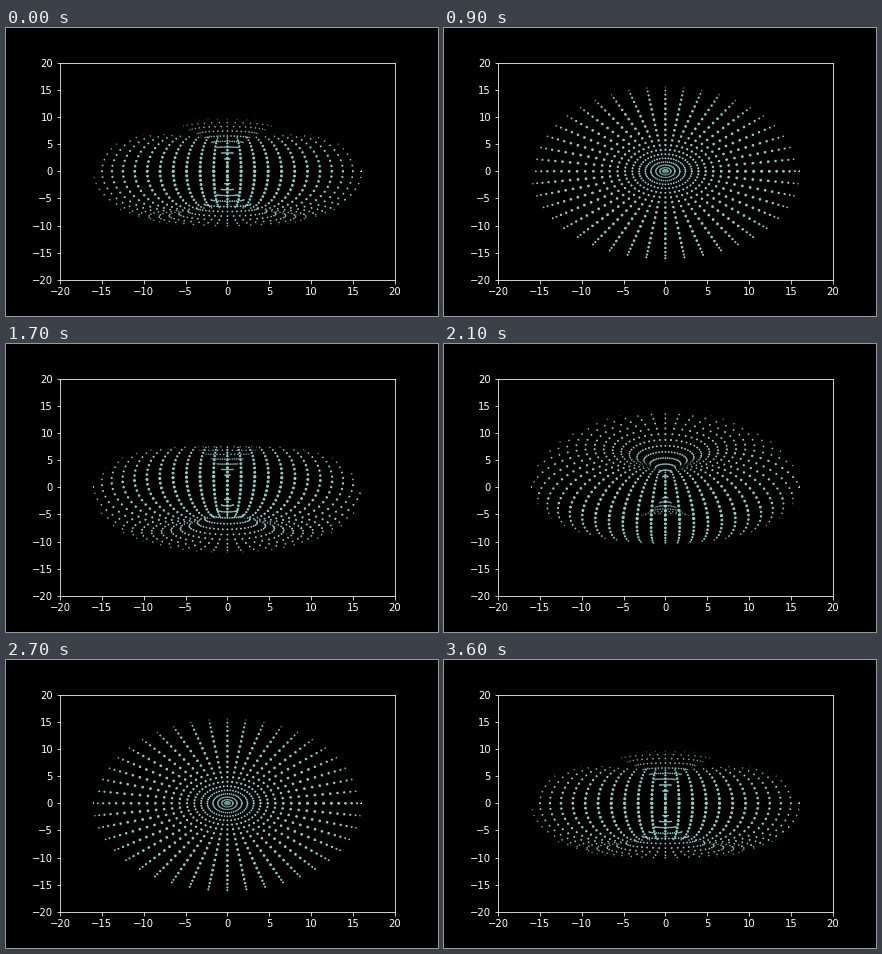
A matplotlib script that plays this animation: 432 px wide and 288 px high, repeating every 3700 ms.

```python
import numpy as np
import matplotlib.pyplot as plt
from matplotlib.animation import FuncAnimation

FRAMES = 37
R = r = 8           # horn torus
DIST = 40           # viewer distance, also the projection scale
LIGHT = np.array([0, -1, 8]) / np.sqrt(65)
DOT = 4.5           # marker area at full light

plt.style.use("dark_background")
fig, ax = plt.subplots(figsize=(6, 4), dpi=72)
fig.subplots_adjust(left=0.125, right=0.9, bottom=0.125, top=0.88)
ax.set_xlim(-20, 20)
ax.set_ylim(-20, 20)
dots = ax.scatter([], [])

steps = np.linspace(0, 2 * np.pi, 45)
theta, phi = (g.ravel() for g in np.meshgrid(steps, steps, indexing="ij"))
normals = np.array([np.cos(theta) * np.cos(phi),
                    np.sin(phi),
                    -np.sin(theta) * np.cos(phi)])
rings = R * np.array([np.cos(theta), 0 * theta, -np.sin(theta)])
points = rings + r * normals
# surface patches shrink towards the hole
area = (R + r * np.cos(phi)) / (R + r)
tilts = np.linspace(0, 2 * np.pi, FRAMES)


def rotate_x(v, a):
    x, y, z = v
    c, s = np.cos(a), np.sin(a)
    return np.array([x, y * c - z * s, y * s + z * c])


def update(i):
    x, y, z = rotate_x(points, tilts[i])
    lum = area * (LIGHT @ rotate_x(normals, tilts[i]))
    lit = lum > 0
    scale = DIST / (DIST + z)
    dots.set_offsets(np.column_stack([x * scale, y * scale])[lit])
    dots.set_sizes(DOT * lum[lit])
    return dots,


anim = FuncAnimation(fig, update, frames=FRAMES, interval=100,
                     repeat=True, repeat_delay=0)
plt.show()
```
